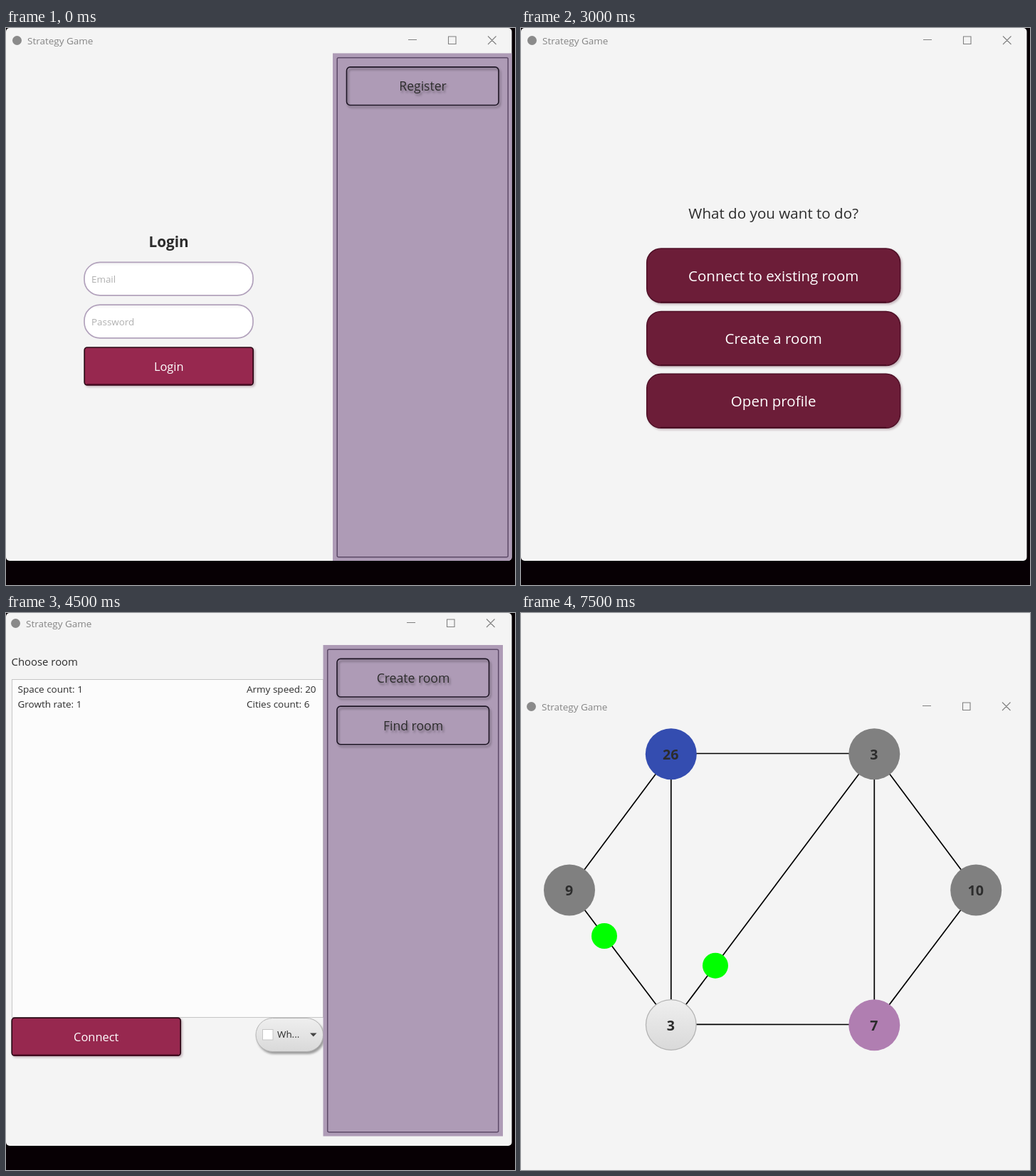
Recreate the animation shown at these times as an HTML page. Size 715x783 px, loop 9000 ms.

```html
<!DOCTYPE html>
<html lang="en">
<head>
<meta charset="utf-8">
<title>Strategy Game</title>
<style>
  html, body { margin: 0; width: 100%; height: 100%; overflow: hidden; background: #070004; }
  svg { display: block; }
  text { font-family: "Open Sans", "Noto Sans", sans-serif; fill: #2c2c2c; white-space: pre; }
  .bold { font-weight: 700; }
  .light { fill: #fff; }
  .hint { fill: #b0b0b0; }
  .title { fill: #858585; }
  .control { fill: none; stroke: #808080; stroke-width: 1.1; }
  .raised { filter: drop-shadow(2px 3px 1.5px rgba(0, 0, 0, .36)); }
  .soft { filter: drop-shadow(2px 2px 1.5px rgba(60, 0, 25, .25)); }
  .outline { fill: none; stroke: #1d1524; stroke-width: 1.6; }
  .edge { stroke: #000; stroke-width: 1.7; }
</style>
</head>
<body>
<svg id="stage" width="715" height="783" viewBox="0 0 715 783"></svg>
<script>
const SCENE_MS = 1500;
const PURPLE = '#ae9bb6', PAPER = '#f4f4f4', BLUE = '#344db0', GREY = '#808080';

// y is the middle of the capital letters
const text = (x, y, str, size, cls = '', anchor = 'start') =>
  `<text x="${x}" y="${y + size * .37}" font-size="${size}" class="${cls}" text-anchor="${anchor}">${str}</text>`;
const centred = (x, y, str, size, cls) => text(x, y, str, size, cls, 'middle');
const rect = (x, y, w, h, attrs) =>
  `<rect x="${x}" y="${y}" width="${w}" height="${h}" ${attrs}/>`;
const circle = (x, y, r, fill, attrs = '') =>
  `<circle cx="${x}" cy="${y}" r="${r}" fill="${fill}" ${attrs}/>`;

const titleBar = (dx, dy) => `<g transform="translate(${dx} ${dy})">
  ${circle(15.5, 17.5, 6.5, '#8a8a8a')}
  ${text(30, 17.6, 'Strategy Game', 13.5, 'title')}
  <path class="control" d="M565 16.5h12M621.5 12h10.5v10.5h-10.5zM677 11.5l11.5 11.5M688.5 11.5L677 23"/></g>`;

const appWindow = (dx, dy, content) => `<g clip-path="url(#frame)">
  ${rect(0, 0, 715, 783, `fill="${PAPER}"`)}${titleBar(dx, dy)}${content}</g>`;

const sidePanel = (x, y, h, labels) =>
  rect(x, y, 252.5, h, `fill="${PURPLE}"`) +
  rect(x + 6.2, y + 6.2, 240, h - 12, 'rx="2" fill="none" stroke="#5d4a68" stroke-width="1.5"') +
  labels.map((label, i) => {
    const top = y + 19.4 + i * 66.7;
    return `<g class="raised">${rect(x + 19.5, top, 213.5, 53.6, 'rx="5" class="outline"')}
      ${centred(x + 126.5, top + 27, label, 17.6)}</g>`;
  }).join('');

const field = (x, y, hint) =>
  rect(x, y, 237, 46.6, 'rx="22" fill="url(#fieldFill)" stroke="#b2a2bc" stroke-width="1.7"') +
  text(x + 10, y + 24, hint, 13.4, 'hint');

const submit = (x, y, label) =>
  `<g class="soft">${rect(x, y, 237, 53, 'rx="4" fill="#97284f" stroke="#2b0815" stroke-width="1.7"')}</g>
  <path d="M${x + 3} ${y + 52.2}h231" stroke="#4a0a22" stroke-width="2"/>` +
  centred(x + 118.5, y + 26.5, label, 16.4, 'light');

const menuButton = (y, label) =>
  `<g class="soft">${rect(176.7, y, 356, 76, 'rx="20" fill="#6c1d38" stroke="#4f1027" stroke-width="1.5"')}</g>
  <path d="M196 ${y + 75.4}h317" stroke="#4a0d23" stroke-width="2"/>` +
  centred(354.7, y + 38.3, label, 20.5, 'light');

const colourPicker = (x, y) =>
  `<g class="raised">${rect(x, y, 94.5, 47, 'rx="23.5" fill="url(#pickerFill)" stroke="#b4b4b4"')}</g>` +
  rect(x + 9.5, y + 16, 14.5, 14.5, 'fill="#fff" stroke="#c6c6c6"') +
  text(x + 30, y + 23, 'Wh...', 13.4) +
  `<path d="M${x + 76} ${y + 21}h9.5l-4.7 5z" fill="#444"/>`;

const list = (x, y, w, h) => rect(x, y, w, h, 'fill="#fcfcfc" stroke="#c6c6c6"');

function board() {
  const nodes = [
    [210.8, 198.2, 26, BLUE], [496.3, 198.2, 3, GREY],
    [68, 389.6, 9, GREY], [639.2, 389.6, 10, GREY],
    [210.8, 579, 3, 'url(#pickerFill)'], [496.3, 579.2, 7, '#b07eb1'],
  ];
  const links = [[0, 1], [0, 2], [0, 4], [1, 3], [1, 4], [1, 5], [2, 4], [3, 5], [4, 5]];
  const lines = links.map(([a, b]) => {
    const [x1, y1] = nodes[a], [x2, y2] = nodes[b];
    return `<line class="edge" x1="${x1}" y1="${y1 - .7}" x2="${x2}" y2="${y2 - .7}"/>`;
  });
  const discs = nodes.map(([x, y, count, fill], i) =>
    circle(x, y, i === 4 ? 35.3 : 36, fill, i === 4 ? 'stroke="#b4b4b4" stroke-width="1.3"' : '') +
    centred(x - .5, y + .4, count, 19.6, 'bold'));
  const armies = [[117, 454], [273, 495.7]].map(([x, y]) => circle(x, y, 18, '#0f0'));
  return lines.concat(discs, armies).join('');
}

const scenes = [
  appWindow(0, 0,
    sidePanel(459, 35.5, 714, ['Register']) +
    centred(228.5, 300, 'Login', 20.7, 'bold') +
    field(110, 329.3, 'Email') + field(110, 389.2, 'Password') + submit(110.2, 449, 'Login')),

  appWindow(-1, -2,
    rect(459, 35.5, 252, 714, `fill="${PURPLE}"`) +
    sidePanel(458, 33.5, 714, ['Login']) +
    centred(228, 268, 'Register', 20.4, 'bold') +
    field(109, 296.8, 'Email') + field(109, 356.8, 'Nickname') + field(109, 416.8, 'Password') +
    submit(109.2, 476.7, 'Register')),

  appWindow(0, 0,
    centred(354.7, 260, 'What do you want to do?', 20.6) +
    menuButton(310, 'Connect to existing room') +
    menuButton(398.5, 'Create a room') + menuButton(486.3, 'Open profile')),

  appWindow(-2, -3,
    text(7.5, 68.5, 'Choose room', 14.9) + list(8.5, 93.5, 437, 475) +
    text(16.5, 107.5, 'Space count: 1', 13.5) + text(16.5, 128.5, 'Growth rate: 1', 13.5) +
    text(338, 107.5, 'Army speed: 20', 13.5) + text(338, 128.5, 'Cities count: 6', 13.5) +
    submit(8.2, 569.2, 'Connect') + colourPicker(351, 569.5) +
    sidePanel(445.5, 45, 690.5, ['Create room', 'Find room'])),

  appWindow(0, -2,
    list(10.5, 46.5, 437, 690) +
    text(19, 61, '1', 13.5) + text(173, 61.5, 'tovi', 13.5) + text(344.5, 61, '(not ready)', 13.4) +
    rect(414, 50.5, 24, 24, `fill="${BLUE}"`) +
    sidePanel(447.3, 46, 690.5, ['Ready', 'Start game', 'Leave lobby', 'Update Lobby']) +
    colourPicker(467.2, 332.5)),

  rect(0, 0, 715, 783, `fill="${PAPER}"`) + titleBar(-1, 114) + board(),
];

const stage = document.getElementById('stage');
stage.innerHTML = `<defs>
  <clipPath id="frame"><rect width="710.5" height="749" rx="5"/></clipPath>
  <linearGradient id="fieldFill" x2="0" y2="1">
    <stop stop-color="#f1f0f2"/><stop offset=".12" stop-color="#fff"/></linearGradient>
  <linearGradient id="pickerFill" x2="0" y2="1">
    <stop stop-color="#efefef"/><stop offset="1" stop-color="#d9d9d9"/></linearGradient>
</defs>` + scenes.map(scene => `<g class="scene">${scene}</g>`).join('');

const groups = [...stage.querySelectorAll('.scene')];
const start = performance.now();

function draw(now) {
  const current = Math.floor(Math.max(0, now - start) / SCENE_MS) % groups.length;
  groups.forEach((group, i) => group.style.display = i === current ? '' : 'none');
  requestAnimationFrame(draw);
}
draw(start);
</script>
</body>
</html>
```
